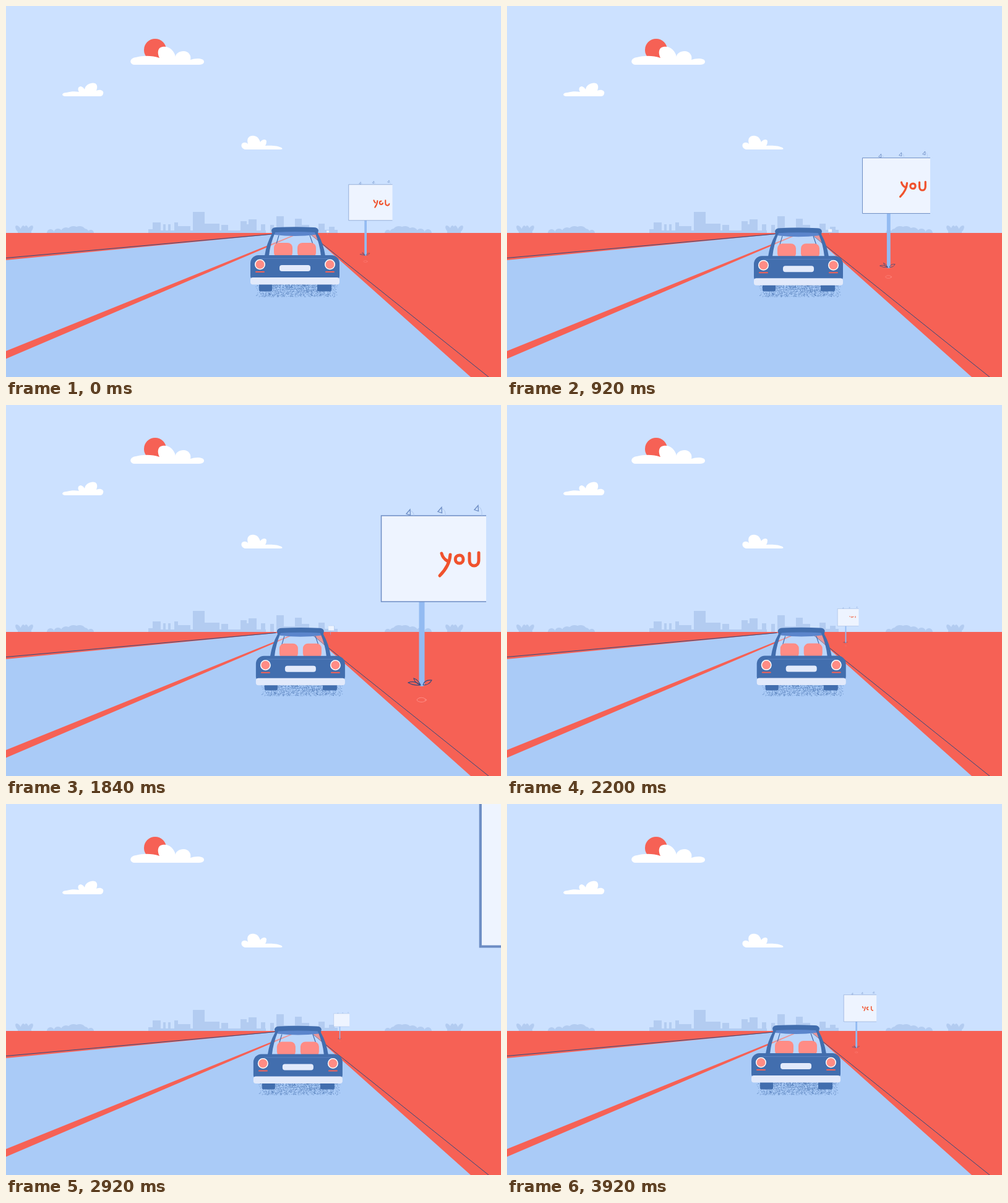
Animation, 800 px wide and 600 px high, one loop 3.96 s. Source, as an HTML page with a canvas:

```html
<!DOCTYPE html>
<html lang="en">
<head>
<meta charset="utf-8">
<title>Road trip</title>
<style>
html, body { margin: 0; height: 100%; overflow: hidden; background: #cce1ff; }
canvas { display: block; }
</style>
</head>
<body>
<canvas id="stage" width="800" height="600"></canvas>
<script>
const ctx = document.getElementById('stage').getContext('2d');
const LOOP = 3960, STEP = 40, SIGN_PERIOD = 800;
const VANISH = { x: 516, y: 367.4 };
const RED = '#f66155', BLUE = '#426eae', INK = '#2f4a7e', PINK = '#ff8c85',
      PALE = '#e2eafb', ROAD = '#aacbf7', CITY = '#b3ccf1';

function fill(path, color) {
  ctx.fillStyle = color;
  ctx.fill(new Path2D(path));
}
function line(path, color, width = 1) {
  ctx.strokeStyle = color;
  ctx.lineWidth = width;
  ctx.stroke(new Path2D(path));
}
function box(x, y, w, h, color, radius = 0) {
  ctx.fillStyle = color;
  ctx.beginPath();
  ctx.roundRect(x, y, w, h, radius);
  ctx.fill();
}
function oval(x, y, rx, ry, color, angle = 0) {
  ctx.fillStyle = color;
  ctx.beginPath();
  ctx.ellipse(x, y, rx, ry, angle, 0, Math.PI * 2);
  ctx.fill();
}
// Draws in coordinates scaled about the vanishing point.
function approach(scale, draw) {
  ctx.save();
  ctx.translate(VANISH.x, VANISH.y);
  ctx.scale(scale, scale);
  ctx.translate(-VANISH.x, -VANISH.y);
  draw();
  ctx.restore();
}

let seed = 7;
const random = () => (seed = seed * 16807 % 2147483647) / 2147483647;
const specks = Array.from({ length: 1500 }, () => {
  const drop = random() ** 1.5;
  return [403 + random() * 120 + random() * 13, 450 + drop * 20];
});

// Left edge, width and top of each building.
const buildings = [
  [230, 190, 363], [230, 8, 361], [237, 13, 350], [254, 4, 353], [262, 4, 353],
  [272, 26, 356], [272, 6, 350], [302, 19, 333], [321, 24, 352], [348, 11, 354],
  [379, 10, 348], [388, 5, 353], [392, 13, 345], [412, 7, 353], [427, 6, 354],
  [437, 12, 340], [449, 87, 362], [449, 19, 358], [467, 11, 344], [478, 12, 354],
  [505, 10, 352], [522, 9, 357]
];

// Strokes of the hand-written word with their lengths.
const lettering = [
  ['M704 240Q706 248 713 252', 16],
  ['M718 242Q717 260 701 276', 40],
  ['M733 243C724 243 724 256 733 256C741 256 741 243 733 243', 41],
  ['M749 240V251C749 263 764 263 764 251V239', 49]
];

function bushes() {
  for (const [x, y, angle] of [[20, 361, -.6], [27, 362, .2], [33, 362, -.1], [39, 361, .6]])
    oval(x, y, 3.5, 7, CITY, angle);
  box(19, 362, 22, 5, CITY);
  for (const [x, r] of [[72, 6], [84, 7], [97, 9], [109, 11], [119, 11], [127, 7], [137, 5]])
    oval(x, 367, r, r, CITY);
}

function scenery() {
  box(0, 0, 800, 600, '#cce1ff');
  oval(241, 71, 18, 18, RED);
  fill('M207 95C199 94 199 84 210 83C222 80 236 80 248 84C244 76 245 67 253 66C263 64 272 72 274 82C274 77 280 73 287 73C295 73 300 80 298 87C306 84 320 84 320 90C320 94 316 95 310 95Z', '#fff');
  fill('M95 146C89 145 90 140 98 140C105 138 112 138 118 139C115 134 117 130 121 130Q125 131 127 135C128 127 138 123 144 125C149 128 147 134 146 137C152 134 159 137 157 142Q156 146 152 146Z', '#fff');
  fill('M386 232C379 230 379 222 384 221Q388 220 391 223C388 213 394 209 401 210C407 211 409 215 411 220C414 215 421 215 421 219Q421 223 419 226C428 225 440 226 445 229Q449 232 443 232Z', '#fff');
  for (const [x, w, top] of buildings) box(x, top, w, 368 - top, CITY);
  bushes();
  ctx.save();
  ctx.translate(754, 0);
  ctx.scale(-1, 1);
  bushes();
  ctx.restore();
  box(0, 367, 800, 233, RED);
  fill('M0 411L455 367H490L751 600H0Z', ROAD);
  fill('M0 558L474 366.5V368L0 570.5Z', RED);
  line('M0 407.5L436 368.5M489 367L780 600', INK);
}

function billboard(written) {
  const outline = '#6d8dc4';
  box(667.5, 318, 9, 137, '#93bbf2', [0, 0, 4, 4]);
  box(606.5, 179, 169.5, 139, '#eef4ff');
  line('M776 179H606.5V318H776', outline, 1.5);
  for (const [x, y] of [[651, 174], [702, 170.5], [761, 167.5]]) {
    line(`M${x - 4} ${y + 2}L${x + 2} ${y - 5}L${x + 2.5} ${y + 4}Z`, outline, 1.3);
    line(`M${x + 3} ${y - 3}Q${x + 9} ${y} ${x + 8} 179`, '#a9c1e8', .8);
  }
  line('M670 453Q660 445 650 449Q658 454 670 453Q666 444 659 442Q660 449 670 453M674 453Q676 444 688 445Q684 453 674 453', INK, 1.1);
  line('M664 477C666 472 677 472 678 477C677 482 665 481 664 477M677 475L680 477L677 479', PINK, 1);
  if (written <= 0) return;
  ctx.lineCap = 'round';
  for (const [path, length] of lettering) {
    ctx.setLineDash([length * written, 100]);
    line(path, '#f0522d', 5);
  }
}

function oncomingCar() {
  ctx.globalAlpha = .35;
  oval(386, 389, 20, 4, BLUE);
  ctx.globalAlpha = 1;
  oval(395.5, 384, 3.2, 5, INK);
  oval(403, 382.5, 2.6, 4.5, INK);
  fill('M369 374Q372 364 376 364H396Q400 365 404 374Z', BLUE);
  fill('M372 373.5L375 367.5H389L392 373.5Z', '#c5dcfb');
  fill('M394 373L391 367.5H396L400 373Z', '#c5dcfb');
  box(374, 370, 6, 4, RED, 1.5);
  box(383, 370, 6, 4, RED, 1.5);
  fill('M363 386V377Q364 373 369 373H403Q407 374 407 379V384H391V386Z', BLUE);
  box(370, 377.5, 15, 6.5, PALE, 1);
  oval(367, 380, 2.4, 2.4, '#fff');
  oval(388, 380, 2.4, 2.4, '#fff');
  box(363.5, 384.5, 28, 3.5, PALE, 1);
  oval(395.5, 384, 1.4, 2.4, ROAD);
  oval(403, 382.5, 1.1, 2.1, ROAD);
}

function car(shift, dip) {
  ctx.save();
  ctx.translate(shift, 0);
  ctx.fillStyle = 'rgba(66,110,174,.5)';
  for (const [x, y] of specks) ctx.fillRect(x, y, 1, 1);
  box(409, 445, 21, 16.5, BLUE, 2);
  box(503, 445, 23, 16.5, BLUE, 2);

  ctx.translate(0, dip);
  fill('M434 368H500L512 404H423Z', 'rgba(212,230,255,.4)');
  line('M441 371L436 388M491 371L497 388', BLUE, 1.2);
  box(433, 383, 30, 24, PINK, 8);
  box(471, 383, 30, 24, PINK, 8);
  fill('M432 364H502L500 370Q467 374 434 370Z', '#5b85cc');
  fill('M418 404Q421 384 430 368L429 363Q430 358 437 358Q467 356.5 497 358Q504 358 505 363L504 368Q513 384 516 404H509Q507 384 499 366Q467 364 435 366Q427 384 425 404Z', BLUE);
  box(395, 403, 144, 40, BLUE, [13, 13, 6, 6]);
  line('M412 408.5H522', '#6088c8', .8);
  for (const x of [410.5, 523.5]) {
    oval(x, 418, 8.5, 8.5, '#fff');
    oval(x, 418, 7, 7, PINK);
    box(x - 7.5, 429, 15, 2, RED, 1);
  }
  box(442, 419, 50, 10, PALE, 4);
  box(395, 439, 144, 11.5, PALE, 4);
  ctx.restore();
}

function render(now) {
  const t = Math.floor(now % LOOP / STEP) * STEP;
  const phase = t % SIGN_PERIOD;
  const sway = (1 - Math.cos(t / LOOP * Math.PI * 2)) / 2;
  scenery();
  for (const age of [phase - SIGN_PERIOD, phase]) {
    const written = Math.min(1, (age + 280) / 400);
    approach(Math.exp(.00364 * (age - 240)), () => billboard(written));
  }
  if (t > 1120 && t < 1840) approach(Math.exp(.0035 * (t - 1360)), oncomingCar);
  car(9 * sway, 2.7 * sway);
}

const start = performance.now();
function tick() {
  render(performance.now() - start);
  requestAnimationFrame(tick);
}
tick();
</script>
</body>
</html>
```
